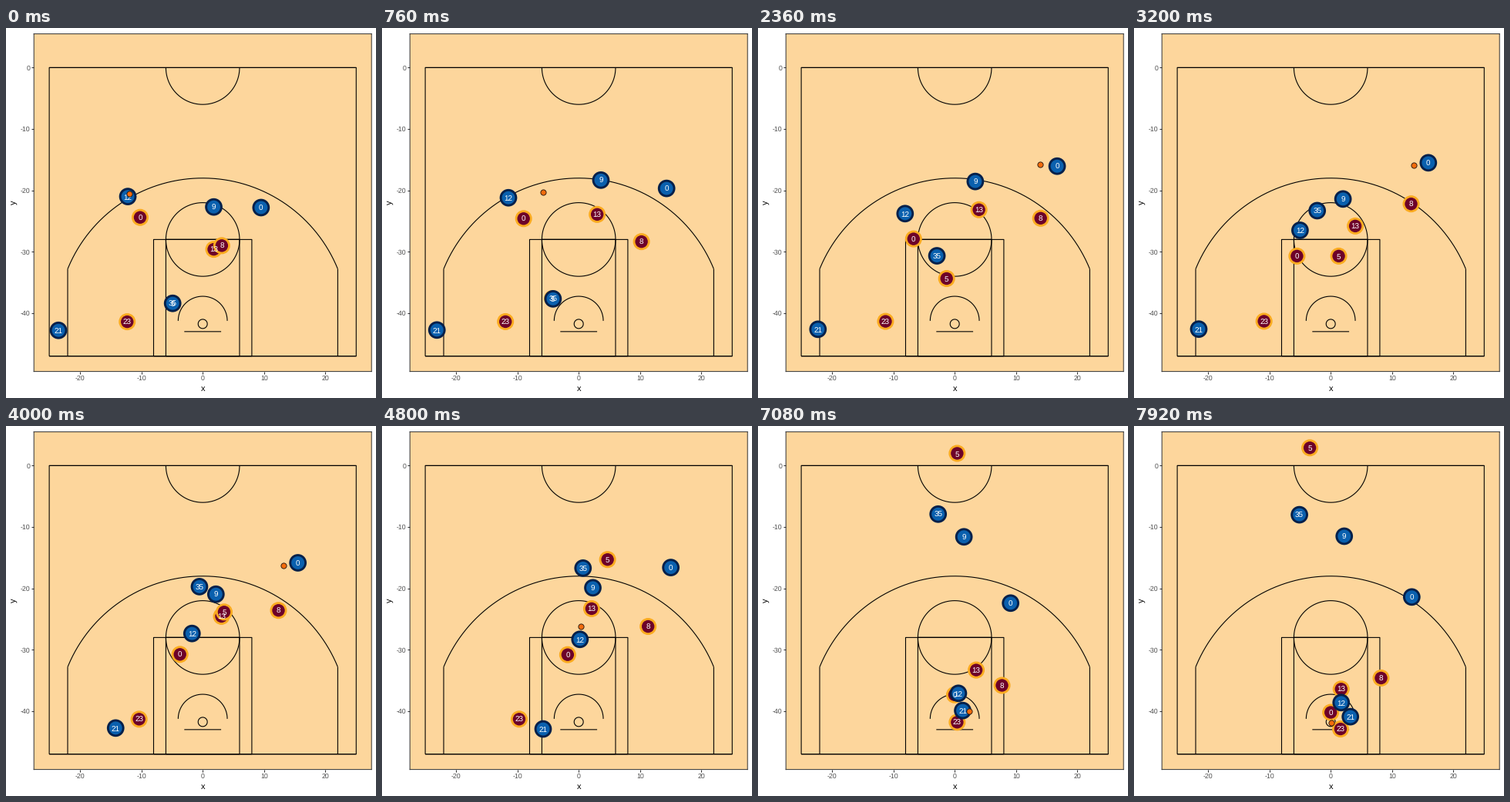
Write a matplotlib script that moves like this. It is 480x480 px and loops after 7.96 s.

```python
from itertools import pairwise

import numpy as np
import matplotlib.pyplot as plt
from matplotlib.animation import FuncAnimation

SIZE, DPI = 480, 96
PT = 72 / DPI                       # points per pixel
FRAMES, INTERVAL = 199, 40
LEFT, TOP, SIDE = 36.2, 7.6, 438    # panel, in pixels
BEATS = (0, 38, 80, 120, 144, 177, 198)
HOOP = (0, -41.75)
ARC = 23.75                         # three-point radius

plt.rcParams.update({
    "font.family": "Liberation Sans",
    "axes.unicode_minus": False,
    "lines.solid_capstyle": "butt",
    "path.snap": False,
    "text.hinting": "none",
})

RED = dict(fill="#6d0029", edge="#fbab1f", r=9.6, lw=2.8)
BLUE = dict(fill="#0a60ae", edge="#04204a", r=9.9, lw=2.9)
players = []
spots = {"hoop": np.tile(HOOP, (FRAMES, 1))}


def run(t, p):
    """Smooth run through points p at frames t that never overshoots a turn."""
    t, p = np.array(t, float), np.array(p, float)
    h = np.diff(t)[:, None]
    s = np.diff(p, axis=0) / h
    same = s[:-1] * s[1:] > 0
    mid = np.where(same, 2 * s[:-1] * s[1:] / np.where(same, s[:-1] + s[1:], 1), 0)
    m = np.vstack([s[:1], mid, s[-1:]])
    f = np.arange(FRAMES)
    i = np.clip(np.searchsorted(t, f, side="right") - 1, 0, len(h) - 1)
    u, h = ((f - t[i]) / h[i, 0])[:, None], h[i]
    ease = u * u * (3 - 2 * u)
    return (p[i] + (p[i + 1] - p[i]) * ease
            + h * u * (1 - u) * ((1 - u) * m[i] - u * m[i + 1]))


def player(team, number, *points):
    """Points are in feet, one per beat; None means just passing through."""
    t, p = zip(*[(b, q) for b, q in zip(BEATS, points) if q])
    path = run(t, p)
    players.append((team, number, path))
    if team is BLUE:
        spots[number] = path


post = (-4.9, -38.4), (-3.5, -36.6)     # 35 and 5 start side by side
player(RED, "0", (-10.2, -24.4), (-7.8, -24.9), (-5.5, -30.7), (-1.8, -30.8),
       (-0.1, -33.1), None, (0, -40.2))
player(RED, "13", (1.8, -29.6), (3.8, -20.5), (4, -25.8), (2.1, -23.3),
       None, (3.5, -33.3), (1.7, -36.4))
player(RED, "8", (3.1, -29), (14.5, -27.5), (13.1, -22.2), (11.3, -26.2),
       (8.2, -30), (7.7, -35.8), (8.2, -34.6))
player(RED, "23", (-12.3, -41.4), None, None, (-9.7, -41.3),
       None, (0.4, -41.8), (1.6, -42.9))
player(RED, "5", *post, (1.3, -30.7), (4.7, -15.3), (4.2, -6.5), (0.4, 2),
       (-3.4, 2.9))
player(BLUE, "21", (-23.5, -42.8), None, (-21.5, -42.6), (-5.8, -42.9),
       (-3.5, -40.4), (1.3, -39.9), (3.2, -40.9))
player(BLUE, "35", *post, (-2.2, -23.3), (0.7, -16.7), None, (-2.7, -7.9),
       (-5.1, -8))
player(BLUE, "9", (1.8, -22.7), (4.7, -15.7), (2, -21.4), (2.3, -19.9),
       None, (1.5, -11.6), (2.2, -11.5))
player(BLUE, "0", (9.5, -22.8), (17.2, -17.3), (15.9, -15.5), (15, -16.6),
       None, (9.1, -22.4), (13.2, -21.4))
player(BLUE, "12", (-12.2, -21), (-10.5, -21.5), (-5, -26.5), (0.2, -28.3),
       (-0.6, -34.2), None, (1.7, -38.6))

# Who has the ball from when, and where it sits beside them
plays = [
    (0, "12", (0.3, 0.4)), (13, "12", (0.3, 0.4)),
    (38, "0", (-3.2, 1)), (80, "0", (-2.4, -0.4)), (102, "0", (-2.4, -0.4)),
    (120, "12", (0.2, 2.1)), (130, "12", (0.3, 0.3)),
    (144, "hoop", (0, -0.5)), (160, "21", (1, -0.1)), (180, "21", (1, -0.1)),
    (198, "hoop", (0.1, -0.2)),
]
ball_path = np.empty((FRAMES, 2))
for (a, giver, hand), (b, taker, catch) in pairwise(plays):
    f = np.arange(a, b + 1)
    u = ((f - a) / (b - a))[:, None]
    ball_path[f] = (1 - u) * (spots[giver][f] + hand) + u * (spots[taker][f] + catch)

fig = plt.figure(figsize=(SIZE / DPI, SIZE / DPI), dpi=DPI, facecolor="white")
ax = fig.add_axes([LEFT / SIZE, 1 - (TOP + SIDE) / SIZE, SIDE / SIZE, SIDE / SIZE],
                  facecolor="#fdd69c")
ax.set(xlim=(-27.5, 27.5), ylim=(-49.5, 5.5),
       xticks=range(-20, 21, 10), yticks=range(-40, 1, 10))
ax.tick_params(length=2.75 * PT, width=1.07 * PT, pad=2.2 * PT, color="#333333",
               labelsize=8.8 * PT, labelcolor="#4d4d4d")
for spine in ax.spines.values():
    spine.set(color="#333333", linewidth=PT)


def title(x, y, text, angle=0):
    fig.text(x / SIZE, 1 - y / SIZE, text, size=11 * PT, rotation=angle,
             ha="center", va="center")


def line(x, y):
    ax.plot(x, y, color="black", lw=1.1 * PT, zorder=1)


def box(x, top, bottom=-47):
    line([-x, -x, x, x, -x], [bottom, top, top, bottom, bottom])


def arc(cy, r, start=0, stop=360):
    a = np.radians(np.linspace(start, stop, 200))
    line(r * np.cos(a), cy + r * np.sin(a))


title(255.2, 468, "x")
title(11, 226.5, "y", 90)
for half_width, top in ((25, 0), (8, -28), (6, -28)):
    box(half_width, top)
for half_width, y in ((25, 0), (25, -47), (6, -28), (3, -43)):
    line([-half_width, half_width], [y, y])
arc(0, 6, 180, 360)
arc(-28, 6)
arc(-41.25, 4, 0, 180)
arc(HOOP[1], 0.75)
corner = np.degrees(np.arccos(22 / ARC))
arc(HOOP[1], ARC, corner, 180 - corner)
for x in (-22, 22):
    line([x, x], [-47, HOOP[1] + np.sqrt(ARC**2 - 22**2)])

teams = [team for team, _, _ in players]
paths = np.array([path for _, _, path in players])
dots = ax.scatter(*paths[:, 0].T, zorder=3, clip_on=False,
                  s=[(2 * t["r"] * PT) ** 2 for t in teams],
                  c=[t["fill"] for t in teams],
                  edgecolors=[t["edge"] for t in teams],
                  linewidths=[t["lw"] * PT for t in teams])
labels = [ax.text(0, 0, number, color="white", size=9.9 * PT, ha="center",
                  va="center_baseline", zorder=4) for _, number, _ in players]
ball = ax.scatter([0], [0], s=(7.2 * PT) ** 2, c="#f36b0c", edgecolors="#2b1a10",
                  linewidths=0.9 * PT, zorder=5)


def update(i):
    dots.set_offsets(paths[:, i])
    for label, (x, y) in zip(labels, paths[:, i]):
        label.set_position((x, y - 0.05))
    ball.set_offsets(ball_path[i:i + 1])
    return [dots, *labels, ball]


anim = FuncAnimation(fig, update, frames=FRAMES, interval=INTERVAL,
                     repeat=True, repeat_delay=0)
plt.show()
```
